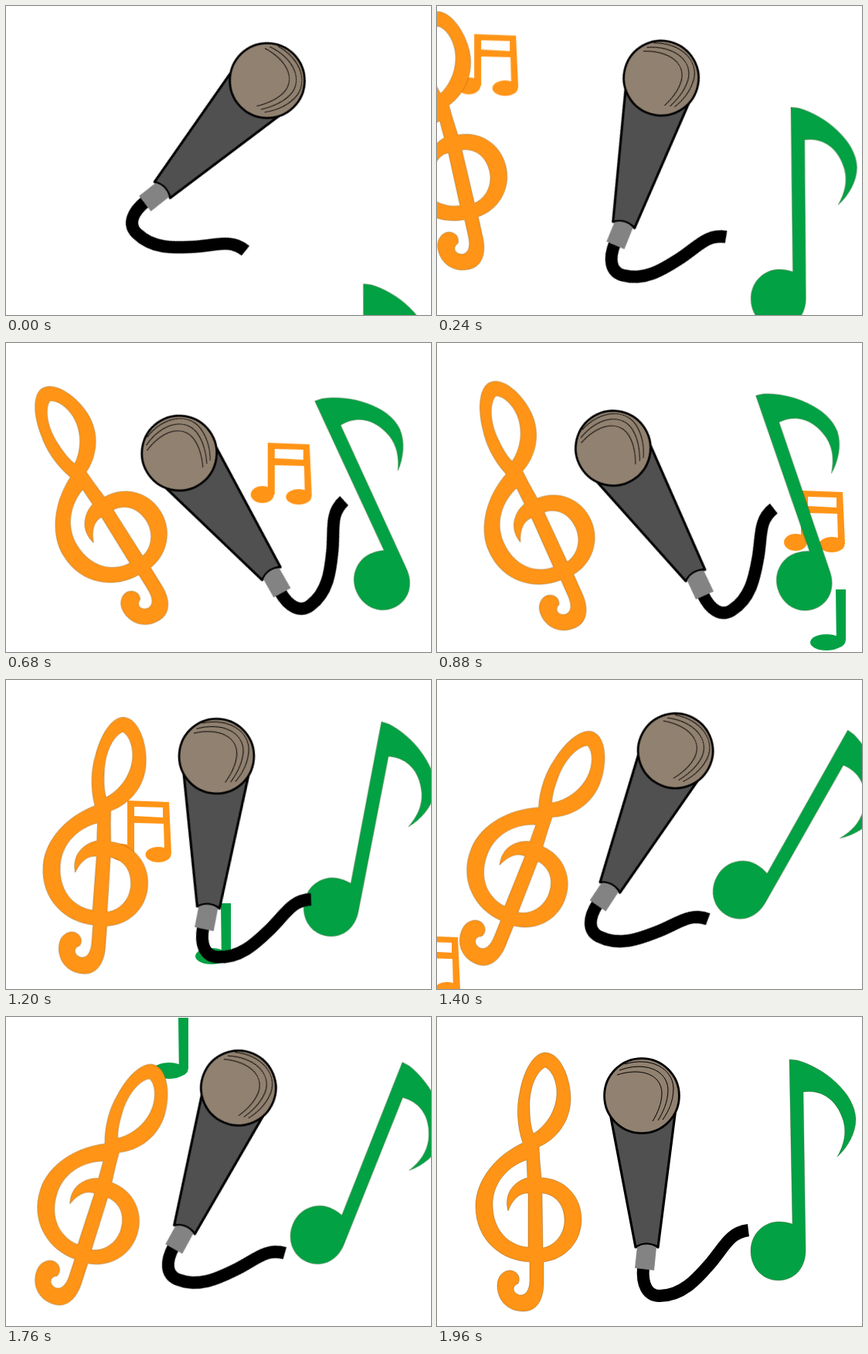
Animation of 550x400 px, one loop 2 s. Source, as an HTML page without scripts:

```html
<!DOCTYPE html>
<html lang="en">
<head>
<meta charset="utf-8">
<title>Music</title>
<style>
html, body { margin: 0; width: 550px; height: 400px; overflow: hidden; background: #fff; }
svg { display: block; }
.part { animation: 2s linear infinite; }
.orange { fill: #ff9416; }
.green { fill: #02a144; }
.edge { stroke: #3a2c00; stroke-opacity: .4; stroke-width: .7; }
.wire { fill: none; stroke: #000; }

/* 25 poses a second: each 2% is one pose */
#mic { transform-origin: 308px 186px; animation-name: mic; }
#note { transform-origin: 475.6px 199px; animation-name: note; }
#clef { transform-origin: 116px 217px; animation-name: clef; }
#pair { animation-name: pair; }
#single { animation-name: single; }

@keyframes mic {
  0% { transform: rotate(45.7deg); animation-timing-function: steps(11); }
  22% { transform: rotate(-8.4deg); animation-timing-function: steps(8); }
  38% { transform: rotate(-44.5deg); animation-timing-function: steps(20); }
  78% { transform: rotate(45.5deg); animation-timing-function: steps(11); }
  100% { transform: rotate(-4.55deg); }
}
@keyframes note {
  0% { transform: translate(4px, 305px) rotate(1deg); animation-timing-function: steps(8); }
  16% { transform: translate(0, 0) rotate(.2deg); animation-timing-function: steps(11); }
  38% { transform: translate(0, 0) rotate(-29.1deg); animation-timing-function: steps(20); }
  78% { transform: translate(0, 0) rotate(45.3deg); animation-timing-function: steps(11); }
  100% { transform: translate(0, 0) rotate(-4.53deg); }
}
@keyframes clef {
  0% { transform: translate(-210px, -74px) rotate(0deg); animation-timing-function: steps(11); }
  22% { transform: translate(-18.7px, -6.6px) rotate(-22.8deg); animation-timing-function: steps(1); }
  24% { transform: translate(0, 0) rotate(-24.2deg); animation-timing-function: steps(7); }
  38% { transform: translate(0, 0) rotate(-34.6deg); animation-timing-function: steps(20); }
  78% { transform: translate(0, 0) rotate(36deg); animation-timing-function: steps(11); }
  100% { transform: translate(0, 0) rotate(-3.6deg); }
}
@keyframes pair {
  0% { transform: translate(-110px, 15px); animation-timing-function: steps(11); }
  22% { transform: translate(180px, 56px); animation-timing-function: steps(11); }
  44% { transform: translate(471px, 192px); animation-timing-function: steps(8); }
  60% { transform: translate(157px, 157px); animation-timing-function: steps(5); }
  70% { transform: translate(-27px, 332px); animation-timing-function: steps(2); }
  74%, 100% { transform: translate(-101px, 402px); }
}
@keyframes single {
  0%, 40% { transform: translate(600px, 327px); animation-timing-function: steps(2); }
  44% { transform: translate(529px, 319px); animation-timing-function: steps(8); }
  60% { transform: translate(291px, 289px); animation-timing-function: steps(5); }
  70% { transform: translate(290px, 92px); animation-timing-function: steps(7); }
  84% { transform: translate(247px, 7px); animation-timing-function: steps(2); }
  88% { transform: translate(236px, 1px); animation-timing-function: steps(5); }
  98%, 100% { transform: translate(-5px, -20px); }
}
</style>
</head>
<body>
<svg width="550" height="400" viewBox="0 0 550 400">
  <g id="pair" class="part orange">
    <path fill-rule="evenodd" d="M0-1L54 1L57 68H48L47 29L9 28V66H0ZM9 7V19L46 21V8Z"/>
    <ellipse cx="-7" cy="66" rx="15" ry="11"/>
    <ellipse cx="40" cy="69" rx="16.5" ry="10"/>
  </g>

  <g id="single" class="part green">
    <path d="M-13 0H0V64Q0 74-12 76Z"/>
    <ellipse cx="-25" cy="68.500" rx="21" ry="10.500"/>
  </g>

  <g id="clef" class="part orange edge">
    <path fill-rule="evenodd" d="M132 168L133 185L135 208C165 209 187 232 187 262C187 292 165 314 138 317
      L138 340C139 366 129 381 112 381C90 381 78 365 78 348C78 335 86 328 95 328C104 329 109 337 105 345
      C97 348 97 357 107 360C117 361 120 350 120 340L120 317C85 316 50 290 50 245C50 210 78 178 111 163
      C103 140 103 115 107 98C113 65 127 46 140 46C160 46 173 80 173 105C173 135 155 158 132 168Z
      M140 65C127 72 119 95 120 118C120 132 122 145 125 151C142 140 155 120 155 98C155 85 150 70 140 65Z
      M116 185C95 192 72 212 72 243C72 275 92 296 118 298L118 228C106 228 98 236 92 251C86 228 100 213 117 208Z
      M136 228C155 230 165 245 165 263C165 282 152 296 137 299Z"/>
  </g>

  <g id="note" class="part green edge">
    <path d="M456 55L466 56C500 65 541 98 542 132C542 150 532 168 518 181C527 165 530 150 526 135
      C519 110 500 93 474 97L477 300C478 325 462 341 442 341C421 341 406 324 406 303C406 280 424 265 442 265
      Q452 265 460 268Z"/>
  </g>

  <g id="mic" class="part">
    <path class="wire" stroke-width="16" d="M267 324C265 346 272 361 288 361C318 361 338 337 352 321C372 298 378 279 403 276"/>
    <path d="M225 130L257 298Q271 290 286 298L308.500 122Z" fill="#505050" stroke="#000" stroke-width="3.200" stroke-linejoin="round"/>
    <path d="M259 297Q271 290 284 298L281 328L256 325Z" fill="#838383"/>
    <path class="wire" stroke-width="2" d="M257 298Q271 289 286 298"/>
    <circle cx="265" cy="102" r="48.400" fill="#918170" stroke="#000" stroke-width="2.800"/>
    <path class="wire" d="M233 75C264 65 290 74 291 98C291 112 285 125 279 135
      M236 69C268 57 298 68 299 94C299 110 292 124 286 134
      M243 61C276 51 305 66 306 92C306 110 299 123 292 133"/>
  </g>
</svg>
</body>
</html>
```
